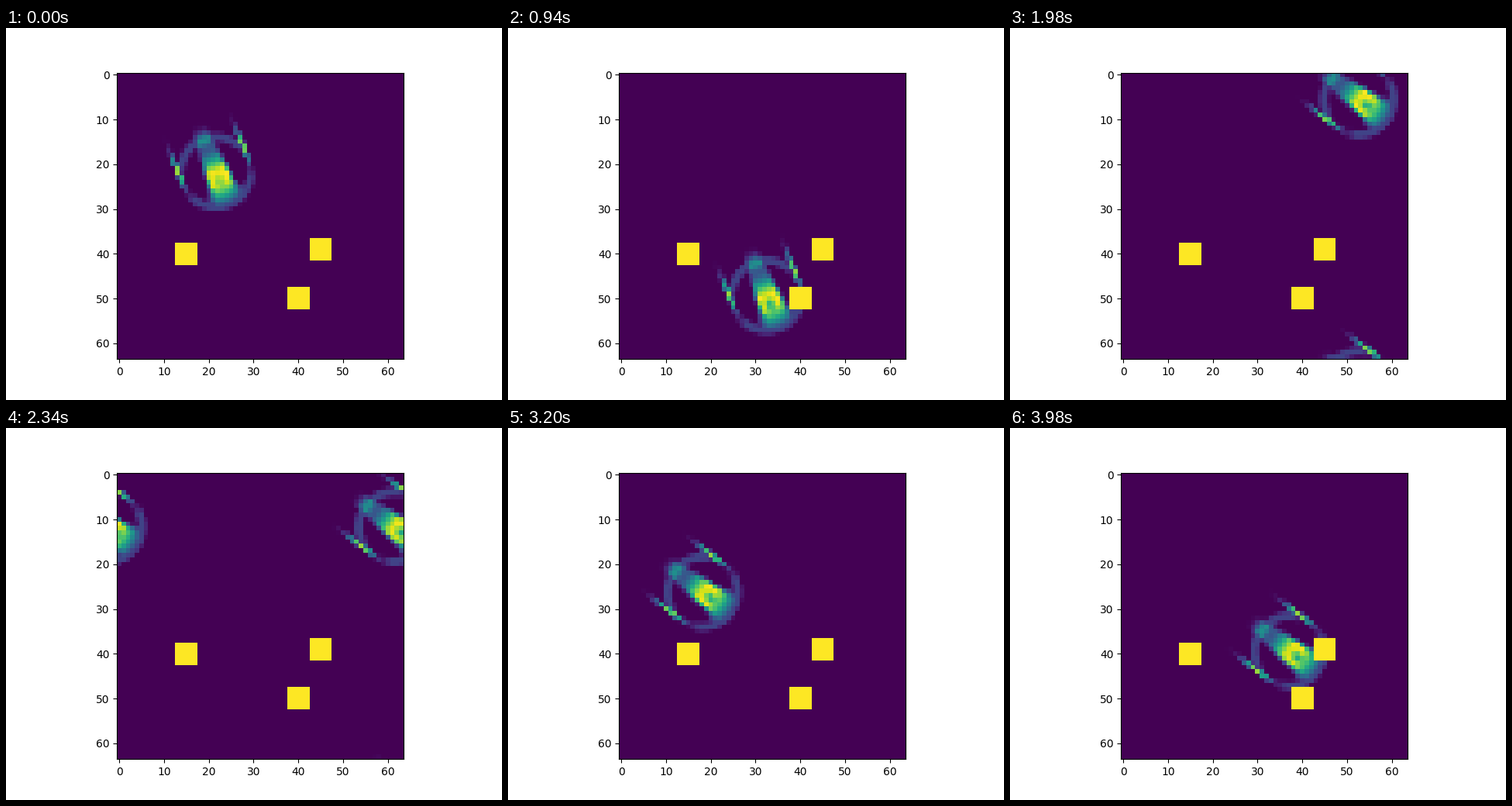
Animation of 640 by 480 pixels, one loop 4000 ms. Source, as a matplotlib script:

```python
import numpy as np
import matplotlib.pyplot as plt
from matplotlib.animation import FuncAnimation

SIZE = 64
FRAMES = 200
BLOCKS = [(15, 40), (45, 39), (40, 50)]
RADIUS = 7.8

# The glider runs straight, turns beside the lowest block, then runs straight
TURN = [0, 50, 80, FRAMES - 1]
PATH_X = [21.6, 33.2, 43.4, 101.1]
PATH_Y = [21.8, 51.1, 63.2, 103.4]

Y, X = np.mgrid[:SIZE, :SIZE]


def ramp(x):
    return np.clip(x, 0, 1)


def bell(x, width):
    return np.exp(-(x / width) ** 2)


def wrap(d):
    return (d + SIZE / 2) % SIZE - SIZE / 2


def pose(i):
    turned = ramp((i - 50) / 45)
    heading = 68 - 31 * turned ** 2 * (3 - 2 * turned)
    return np.interp(i, TURN, PATH_X), np.interp(i, TURN, PATH_Y), np.radians(heading)


def trunk(u, v, r, dip):
    """Tail blob and stalk growing into a bright core that fades at the front."""
    along = ramp(0.5 * bell(u + 7.5, 1.8) + ramp(1 + 0.16 * u))
    front = np.where(u > 0, 0.17 * (8.9 - r), 1)
    width = 2.55 + 0.1 * u + 0.35 * np.maximum(u - 4, 0)
    soft = 1.2 + 0.6 * np.clip(u - 3, 0, 3)
    side = ramp((width - np.abs(v - 0.2)) / soft + 0.5)
    hole = dip * bell(u - 2.3, 1.5) * bell(v, 1.1)
    return side * (np.minimum(along, front) - hole)


def shell(u, v, r):
    """Faint rim at front and back, joined by two thin bright straight horns."""
    rim = 0.2 * ramp((1.3 - np.abs(r - RADIUS)) / 0.8)
    rim = rim * ramp(3 * np.abs(u) / r - 0.6)
    gap = np.where(u < 0, np.abs(v), r) - RADIUS
    horn = 0.85 * bell(u + 3.2, 3.7) * ramp((0.75 - np.abs(gap)) / 0.5)
    return np.maximum(rim, horn)


def world(i):
    cx, cy, angle = pose(i)
    dx, dy = wrap(X - cx), wrap(Y - cy)
    u = dx * np.cos(angle) + dy * np.sin(angle)
    v = dx * np.sin(angle) - dy * np.cos(angle)
    r = np.hypot(u, v) + 1e-9

    dip = min(0.2 + 0.01 * i, 0.4)
    cells = ramp(np.maximum(trunk(u, v, r, dip), shell(u, v, r)))
    for bx, by in BLOCKS:
        cells[by - 2:by + 3, bx - 2:bx + 3] = 1
    return cells


fig, ax = plt.subplots(figsize=(6.4, 4.8), dpi=100)
image = ax.imshow(world(0), cmap="viridis", vmin=0, vmax=1)


def update(i):
    image.set_data(world(i))
    return (image,)


anim = FuncAnimation(fig, update, frames=FRAMES, interval=20,
                     repeat=True, repeat_delay=0)
plt.show()
```
